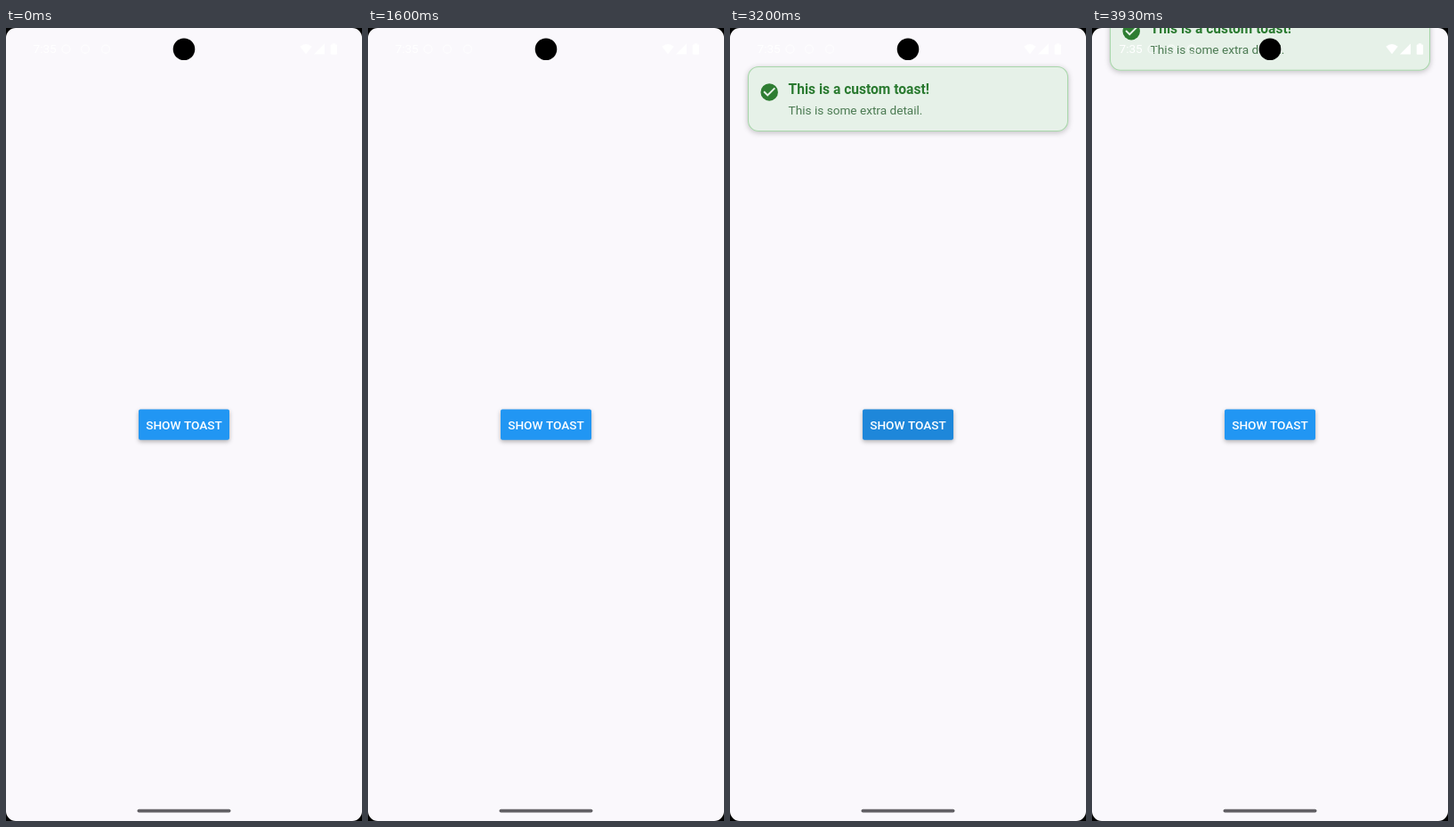
An HTML page with a canvas for the animation above (4 s loop, 400 by 889 pixels).

```html
<!DOCTYPE html>
<html lang="en">
<head>
<meta charset="utf-8">
<title>Custom toast</title>
<style>
  html, body { margin: 0; width: 100%; height: 100%; overflow: hidden; background: #000; }
  canvas { display: block; width: 400px; height: 889px; }
</style>
</head>
<body>
<canvas id="stage"></canvas>
<script>
const W = 400, H = 889, LOOP = 4000, STEP = 1000 / 15;
const DP = 400 / 411;
const REST = 68, HIDDEN = -80;

const canvas = document.getElementById('stage');
const ctx = canvas.getContext('2d');
const dpr = window.devicePixelRatio || 1;
canvas.width = W * dpr;
canvas.height = H * dpr;

const clamp = v => Math.min(1, Math.max(0, v));
const span = (t, start, length) => clamp((t - start) / length);
const easeOut = p => 1 - (1 - p) ** 3;
const easeInOut = p => p < 0.5 ? 4 * p ** 3 : 1 - 4 * (1 - p) ** 3;

function box(x, y, w, h, r, fill) {
  ctx.beginPath();
  ctx.roundRect(x, y, w, h, r);
  ctx.fillStyle = fill;
  ctx.fill();
}

function disc(x, y, r, fill) {
  ctx.beginPath();
  ctx.arc(x, y, r, 0, Math.PI * 2);
  ctx.fillStyle = fill;
  ctx.fill();
}

function poly(points, fill) {
  ctx.beginPath();
  points.forEach(([x, y]) => ctx.lineTo(x, y));
  ctx.closePath();
  ctx.fillStyle = fill;
  ctx.fill();
}

function text(str, x, y, size, weight, fill, align = 'left') {
  ctx.font = `${weight} ${size * DP}px Roboto, sans-serif`;
  ctx.textAlign = align;
  ctx.fillStyle = fill;
  ctx.fillText(str, x, y);
}

function shadow(color, blur, dy) {
  ctx.shadowColor = color;
  ctx.shadowBlur = blur * dpr;
  ctx.shadowOffsetY = dy * dpr;
}

function drawButton(press) {
  ctx.save();
  shadow('rgba(0,0,0,0.3)', 5, 2);
  box(149, 427.6, 102, 34.2, 2, '#2196f3');
  ctx.restore();
  if (press > 0) box(149, 427.6, 102, 34.2, 2, `rgba(0,0,0,${press})`);
  text('SHOW TOAST', 200, 450, 14, 500, '#fff', 'center');
}

function drawToast(y) {
  ctx.save();
  ctx.translate(0, y);
  ctx.save();
  shadow('rgba(0,0,0,0.24)', 6, 1.5);
  box(20, 0, 360, 73, 12, '#e6f1e8');
  ctx.restore();
  ctx.beginPath();
  ctx.roundRect(20.5, 0.5, 359, 72, 11.5);
  ctx.strokeStyle = '#a9d6ab';
  ctx.lineWidth = 1.1;
  ctx.stroke();

  disc(44.2, 29, 10 * DP, '#2e7d32');
  const tick = [[-2, 5], [-7, 0], [-5.59, -1.41], [-2, 2.17], [5.59, -5.42], [7, -4]];
  poly(tick.map(([a, b]) => [44.2 + a * DP, 29 + b * DP]), '#e6f1e8');

  text('This is a custom toast!', 65.6, 31.5, 16, 700, '#2a7a30');
  text('This is some extra detail.', 65.6, 54.5, 14, 400, '#4b7a52');
  ctx.restore();
}

function drawStatus() {
  const ink = '#fff';
  text('7:35', 30.5, 28.3, 14, 400, ink);

  ctx.strokeStyle = 'rgba(255,255,255,0.7)';
  ctx.lineWidth = 1.2;
  for (const x of [67.5, 89, 112]) {
    ctx.beginPath();
    ctx.arc(x, 23.7, 4.5, 0, Math.PI * 2);
    ctx.stroke();
  }

  ctx.beginPath();
  ctx.moveTo(337, 29.3);
  ctx.lineTo(330.3, 20.8);
  ctx.quadraticCurveTo(337, 15.4, 343.7, 20.8);
  ctx.closePath();
  ctx.fillStyle = ink;
  ctx.fill();

  poly([[346, 29.4], [358, 29.4], [358, 17.6]], ink);
  box(364.7, 18.6, 7.4, 11.2, 1, ink);
  box(366.7, 17.2, 3.4, 2, 0.5, ink);
}

function draw(t) {
  ctx.setTransform(dpr, 0, 0, dpr, 0, 0);
  ctx.fillStyle = '#000';
  ctx.fillRect(0, 0, W, H);
  box(0, 0, W, H, 11, '#faf8fc');

  drawButton(0.1 * span(t, 3000, 130) * (1 - span(t, 3200, 600)));

  ctx.save();
  ctx.beginPath();
  ctx.roundRect(0, 0, W, H, 11);
  ctx.clip();
  const shown = easeOut(span(t, 3066, 300)) - easeInOut(span(t, 3758, 320));
  if (shown > 0) drawToast(HIDDEN + (REST - HIDDEN) * shown);
  drawStatus();
  ctx.restore();

  disc(200, 23.7, 12.3, '#000');
  box(147.5, 875.7, 105, 3.8, 1.9, '#626065');
}

function snap(t) {
  const tick = n => Math.round(n * STEP / 10) * 10;
  const n = Math.floor(t / STEP);
  return (tick(n) > t ? n - 1 : tick(n + 1) <= t ? n + 1 : n) * STEP;
}

const start = performance.now();
function loop() {
  draw(snap((performance.now() - start) % LOOP));
  requestAnimationFrame(loop);
}
loop();
</script>
</body>
</html>
```
